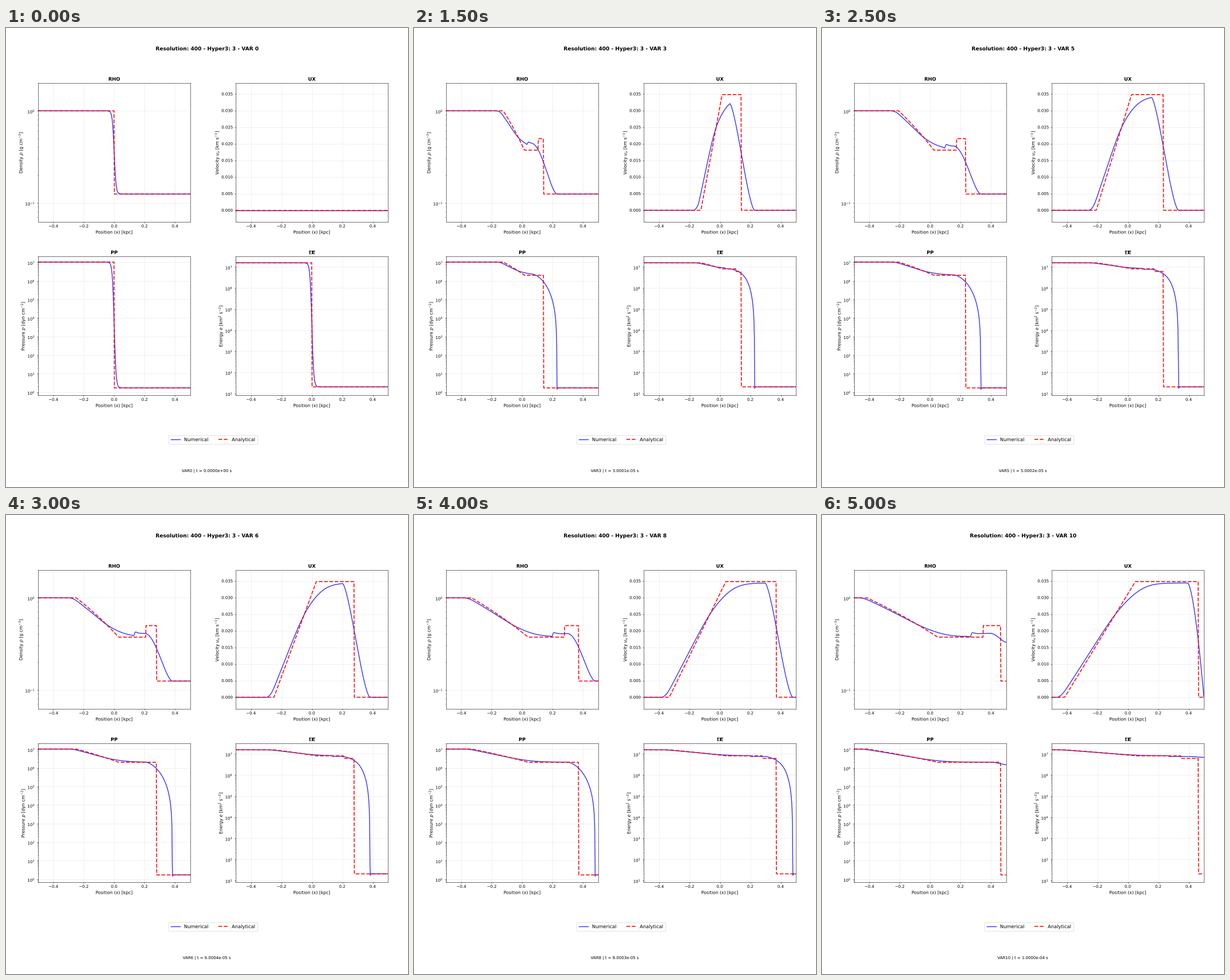
These frames come from a looping animation (700x800 px, 5500 ms). A matplotlib script:

```python
import numpy as np
import matplotlib.pyplot as plt
import matplotlib.patheffects as pe
from matplotlib.animation import FuncAnimation
from matplotlib.text import Text

# Shock tube, gamma = 5/3; time in 1e-5 s, speeds in 1e5 km/s
C = 0.04156          # left sound speed
U_STAR = 0.0348      # exact plateau velocity
U_NUM = 0.0344       # plateau velocity of the numerical run
RHO_R = 0.125
P_L, P_R = 0.6 * C**2 * 1e10, 1.7
WALL = 0.5

TIMES = [0, 1.0000, 2.0003, 3.0001, 4.0000, 5.0002,
         6.0004, 7.0002, 8.0003, 9.0001, 10.0000]
x = np.linspace(-0.5, 0.5, 400)


def energy(p, rho):
    return p / (2 / 3 * rho)


def analytical(t):
    if t == 0:
        u = np.zeros_like(x)
    else:
        u = np.clip(0.75 * (C + x / t), 0, U_STAR)
    a = 1 - u / (3 * C)
    rho, p = a**3, P_L * a**5
    contact, shock = U_STAR * t, 4 / 3 * U_STAR * t
    rho = np.where(x > contact, 4 * RHO_R, rho)
    ahead = x > shock
    u = np.where(ahead, 0, u)
    rho = np.where(ahead, RHO_R, rho)
    p = np.where(ahead, P_R, p)
    return rho, u, p, energy(p, rho)


def initial():
    k = 0.5 * (1 + np.tanh(x / 0.0125))
    rho = RHO_R**k
    p = P_L * (P_R / P_L)**k
    return rho, np.zeros_like(x), p, energy(p, rho)


def simple_wave(t):
    """Rarefaction: each velocity travels along its own characteristic."""
    depth = np.linspace(0, 12, 3000)
    u = U_NUM * (1 - np.exp(-depth))
    low, high = -0.024 + 0.6 * u, 0.046 * depth - 0.062
    start = 0.008 * np.logaddexp(low / 0.008, high / 0.008)
    start -= 0.02 * np.exp(-u / 0.0008)
    return start + (4 / 3 * u - C) * t, u


def numerical(t):
    if t == 0:
        return initial()
    foot = 0.0464 * t + 0.125 - 0.153 / (t + 1.3)
    peak = foot - 0.182 * (1 - np.exp(-(t + 0.25) / 1.45))
    contact = 0.0344 * t - 0.074 + 0.027 * np.exp(-t / 2.45)
    hit = np.clip((foot - WALL) / 0.0755, 0, 1)

    wave_x, wave_u = simple_wave(t)
    u = np.interp(x, wave_x, wave_u)
    u_peak = np.interp(peak, wave_x, wave_u)
    a = 1 - u / (3 * C)
    p = P_L * a**5
    p_peak = P_L * (1 - u_peak / (3 * C))**5

    # density: isentropic fan, contact bump, plateau
    level = 0.398 + 0.0014 * t + 0.25 * np.exp(-0.7 * t)
    slope = 0.98 + 0.02 * np.clip((x - contact) / (peak - contact), 0, 1)
    bump = 0.07 * np.exp(-t / 9) * (1 - np.exp(-t))
    right = level * slope + bump * np.exp(-np.maximum(x - contact, 0) / 0.02)
    k = 0.5 * (1 + np.tanh((x - contact) / 0.005))
    dip = 0.006 * np.exp(-((x - contact + 0.008) / 0.005)**2)
    rho = a**3 * (1 - k) + right * k - dip

    # smeared shock front between peak and foot (or wall)
    q = np.clip((x - peak) / (min(foot, WALL) - peak), 0, 1)
    front = x > peak
    h = (1 - q**1.9)**1.75
    rho_end = RHO_R * (0.33 / RHO_R)**hit
    rho = np.where(front, rho_end * (rho / rho_end)**h, rho)
    u_front = u_peak * (1 - q**(1.45 + 0.15 * hit))**(1.6 - 0.6 * hit)
    u = np.where(front, u_front, u)
    if hit > 0:
        p_end = 1.5e6 * np.exp(-4 * (1 - hit))
        p_front = p_end * (p_peak / p_end)**h
    else:
        p_front = p_peak * (1 - q**1.5)**(2.6 - 0.5 * q**6)
    p = np.where(front, np.maximum(p_front, P_R), p)
    if foot < WALL:
        p[np.argmax(x > foot)] *= 0.85
    return rho, u, p, energy(p, rho)


PANELS = [
    ("RHO", r"Density $\rho$ [g cm$^{-3}$]", (0.0625, 2), True),
    ("UX", r"Velocity $u_x$ [km s$^{-1}$]", (-0.1 * U_STAR, 1.1 * U_STAR), False),
    ("PP", r"Pressure $p$ [dyn cm$^{-2}$]", (0.69, 2 * P_L), True),
    ("EE", r"Energy $e$ [km$^2$ s$^{-2}$]", (8.2, 3 * P_L), True),
]

fig, axes = plt.subplots(2, 2, figsize=(14, 16), dpi=50)
fig.subplots_adjust(left=0.08, right=0.95, top=0.88, bottom=0.2,
                    wspace=0.3, hspace=0.25)
num_lines, ana_lines = [], []
for ax, (name, label, ylim, log) in zip(axes.flat, PANELS):
    if log:
        ax.set_yscale("log")
    num_lines += ax.plot(x, np.ones_like(x), "b-", lw=2, alpha=0.8,
                         label="Numerical")
    ana_lines += ax.plot(x, np.ones_like(x), "r--", lw=2.5, alpha=0.9,
                         label="Analytical")
    ax.set_xlim(-0.5, 0.5)
    ax.set_ylim(*ylim)
    ax.set_title(name, fontsize=12, fontweight="bold")
    ax.set_xlabel("Position (x) [kpc]", fontsize=11)
    ax.set_ylabel(label, fontsize=11, labelpad=1.2)
    ax.grid(True, alpha=0.3)

fig.legend(handles=[num_lines[0], ana_lines[0]], loc="center", ncol=2,
           fontsize=12, bbox_to_anchor=(0.515, 0.103))
title = fig.suptitle("", y=0.96, fontsize=13, fontweight="bold")
footer = fig.text(0.5, 0.03, "", ha="center", va="bottom", fontsize=10)

# draw text as outlines, free of low-resolution hinting
fig.draw_without_rendering()
for text in fig.findobj(Text):
    text.set_path_effects([pe.Normal()])


def update(i):
    t = TIMES[i]
    for line, y in zip(num_lines, numerical(t)):
        line.set_ydata(y)
    for line, y in zip(ana_lines, analytical(t)):
        line.set_ydata(y)
    title.set_text(f"Resolution: 400 - Hyper3: 3 - VAR {i}")
    footer.set_text(f"VAR{i} | t = {t * 1e-5:.4e} s")
    return [*num_lines, *ana_lines, title, footer]


anim = FuncAnimation(fig, update, frames=len(TIMES), interval=500, repeat=True)
plt.show()
```
